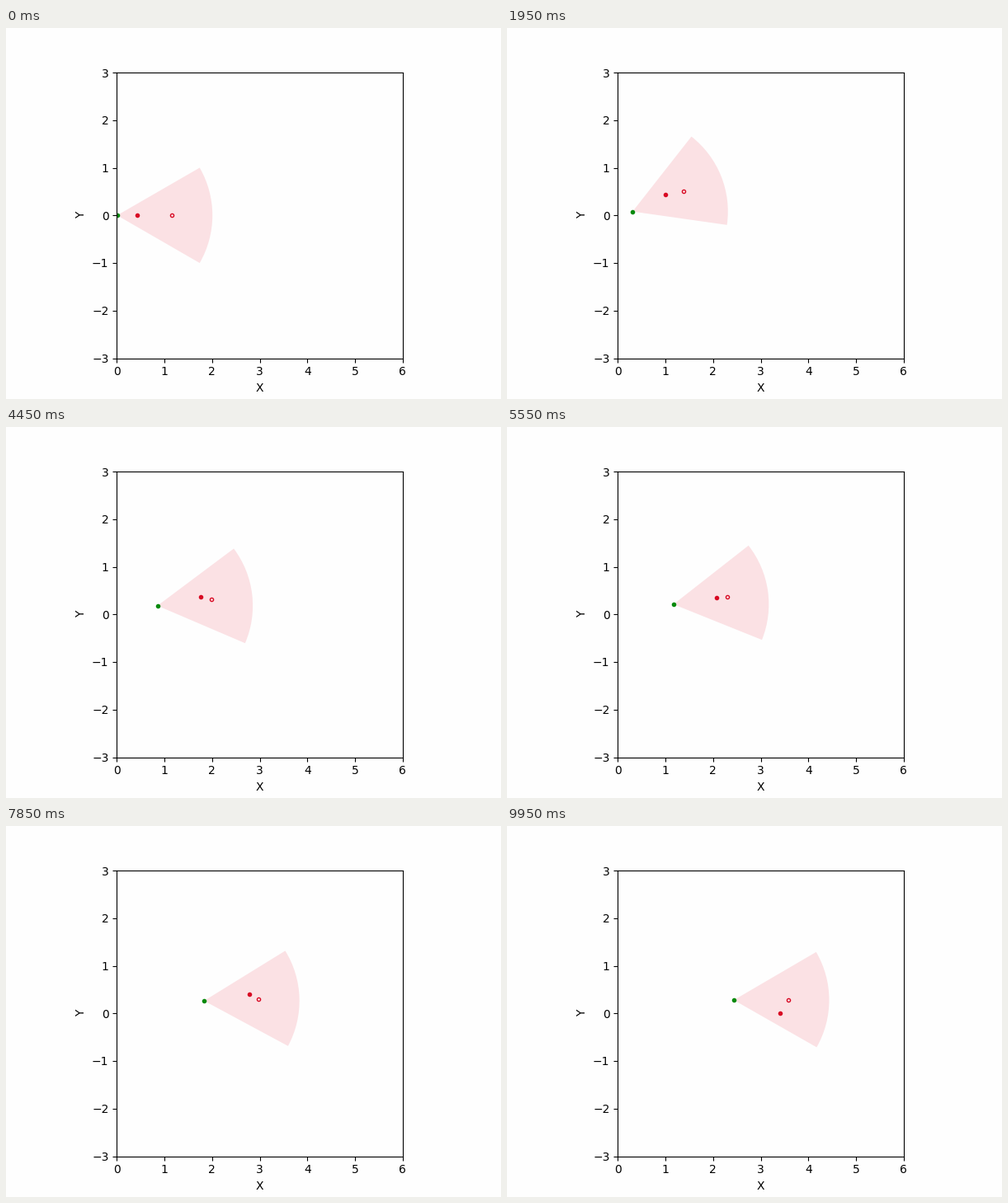
These frames come from a looping animation (600x450 px, 10000 ms). A matplotlib script:

```python
import numpy as np
import matplotlib.pyplot as plt
from matplotlib.animation import FuncAnimation
from matplotlib.patches import Wedge

STEPS = 150        # simulation steps in one loop
SLOTS = 200        # display slots of 50 ms
RANGE = 2.0        # sector radius
HALF_ANGLE = 30.0  # sector half opening, degrees
FOCUS = 1.145      # distance of the hollow marker ahead of the apex
RED = "#d80a24"


def smooth_path(knots):
    """Cubic Hermite curve through (step, value) knots, sampled at every step."""
    t, v = np.array(knots, dtype=float).T
    slope = np.gradient(v, t)
    k = np.arange(STEPS)
    i = np.clip(np.searchsorted(t, k, side="right") - 1, 0, len(t) - 2)
    h = t[i + 1] - t[i]
    u = (k - t[i]) / h
    return ((1 + 2 * u) * (1 - u) ** 2 * v[i] + u * (1 - u) ** 2 * h * slope[i]
            + u * u * (3 - 2 * u) * v[i + 1] + u * u * (u - 1) * h * slope[i + 1])


# Target: steady drift in x, raised cosine in y
step = np.arange(STEPS)
target_x = 0.42 + 0.02 * step
target_y = 0.234 * (1 - np.cos(2 * np.pi * (step - 0.5 + (step > 0)) / 50))
target_y[0] = 0

# Follower pose
robot_x = smooth_path([(0, 0.008), (8, 0.045), (16, 0.112), (29, 0.312), (40, 0.445),
                       (50, 0.57), (64, 0.80), (83, 1.17), (103, 1.543),
                       (133, 2.128), (149, 2.437)])
robot_y = smooth_path([(0, 0), (8, 0.002), (16, 0.02), (29, 0.081), (50, 0.144),
                       (83, 0.211), (103, 0.245), (133, 0.275), (149, 0.279)])
heading = smooth_path([(0, 0), (4, 1.6), (8, 6), (12, 12), (16, 16.8), (20, 19.5),
                       (24, 21.2), (29, 21.9), (33, 21.3), (40, 17), (45, 12),
                       (50, 7.9), (57, 6.1), (64, 6.5), (75, 7.8), (83, 8.1),
                       (96, 5), (103, 2.9), (112, 1.6), (121, 1.9), (133, 3.5),
                       (138, 3.2), (144, 1.6), (149, 0.3)])
focus_x = robot_x + FOCUS * np.cos(np.radians(heading))
focus_y = robot_y + FOCUS * np.sin(np.radians(heading))

fig, ax = plt.subplots(figsize=(6, 4.5), dpi=100, facecolor="#fefefe")
ax.set_facecolor("#fefefe")
ax.set_aspect("equal")
ax.set_xlim(0, 6)
ax.set_ylim(-3, 3)
ax.set_xticks(range(7))
ax.set_yticks(range(-3, 4))
ax.set_xlabel("X")
ax.set_ylabel("Y")

sector = Wedge((0, 0), RANGE, -HALF_ANGLE, HALF_ANGLE, facecolor="#fbe1e4", linewidth=0)
ax.add_patch(sector)


def marker(color, **style):
    return ax.plot([], [], "o", color=color, markersize=3, **style)[0]


robot = marker("#058a0c")
target = marker(RED)
focus = marker(RED, markerfacecolor="none")


def draw(slot):
    k = int(0.75 * slot + 0.375)  # 15 steps per second shown at 20 per second
    sector.set_center((robot_x[k], robot_y[k]))
    sector.set_theta1(heading[k] - HALF_ANGLE)
    sector.set_theta2(heading[k] + HALF_ANGLE)
    robot.set_data([robot_x[k]], [robot_y[k]])
    target.set_data([target_x[k]], [target_y[k]])
    focus.set_data([focus_x[k]], [focus_y[k]])
    return sector, robot, target, focus


anim = FuncAnimation(fig, draw, frames=SLOTS, interval=50, repeat=True, repeat_delay=0)
plt.show()
```
